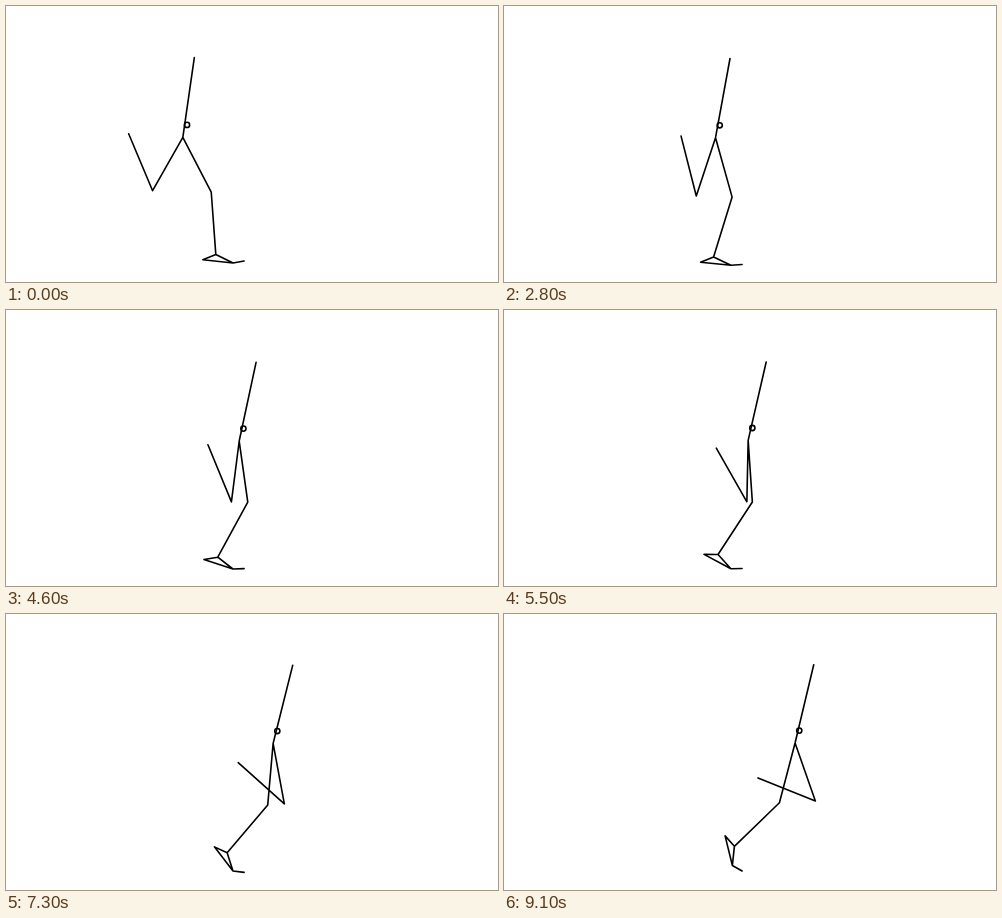
Recreate the animation shown at these times as an HTML page. Size 492 px wide and 276 px high, loop 9.2 s.

```html
<!DOCTYPE html>
<html lang="en">
<head>
<meta charset="utf-8">
<title>Walking stick figure</title>
<style>
  html, body { margin: 0; width: 100%; height: 100%; overflow: hidden; background: #fff; }
  svg { display: block; width: 492px; height: 276px; }
  path, circle { fill: none; stroke: #000; stroke-width: 1.6; stroke-linejoin: round; stroke-linecap: round; }
</style>
</head>
<body>
<svg viewBox="0 0 492 276">
  <path id="body"/>
  <circle id="mass" r="2.6"/>
</svg>
<script>
const LOOP = 9200, STEP = 100;

// A smooth curve through evenly spaced values (Lagrange), s from 0 to 1.
const curve = (...v) => s => {
  const u = s * (v.length - 1);
  return v.reduce((sum, y, i) =>
    sum + v.reduce((p, _, j) => j === i ? p : p * (u - j) / (i - j), y), 0);
};

// Joint angles in degrees from straight down, positive towards the right.
const angle = {
  toe:        curve(100.3, 94.2, 92.1, 85.8, 60.2),
  foot:       curve(64, 66.2, 52.5, 24.5, -6),
  shank:      curve(4.2, -13.4, -28.3, -38.7, -45.9),
  thigh:      curve(27.4, 17.75, 8.2, -2.55, -14.7),
  swingThigh: curve(-29.5, -21, -7.6, 7.6, 19.3),
  // These two point up, so they lean from straight up instead.
  swingShank: curve(-22.8, -13.8, -22, -43, -68.1),
  trunk:      curve(8.2, 9.9, 12.05, 13.9, 13.4)
};
const size = { toe: 11.2, foot: 19.2, heel: 14, shank: 62.7, thigh: 61.7,
               swingThigh: 61.4, swingShank: 61.8, trunk: 80.5 };
const HEEL_ANGLE = -132.4;
const toeX = 238.1, toeY = curve(255, 258.4, 258.6, 258.5, 257);

function move([x, y], length, degrees) {
  const a = degrees * Math.PI / 180;
  return [x + length * Math.sin(a), y + length * Math.cos(a)];
}

// The planted toe carries the leg, the hip carries the rest.
function pose(s) {
  const down = (from, part) => move(from, size[part], angle[part](s));
  const back = (from, part) => move(from, -size[part], angle[part](s));
  const up = (from, part) => move(from, size[part], 180 - angle[part](s));

  const toe = [toeX, toeY(s)];
  const ball = back(toe, "toe");
  const ankle = back(ball, "foot");
  const heel = move(ankle, size.heel, angle.foot(s) + HEEL_ANGLE);
  const knee = back(ankle, "shank");
  const hip = back(knee, "thigh");
  const top = up(hip, "trunk");
  const swingKnee = down(hip, "swingThigh");
  const swingAnkle = up(swingKnee, "swingShank");
  return {
    limbs: [
      [top, hip, knee, ankle, heel, ball, ankle],
      [ball, toe],
      [hip, swingKnee, swingAnkle]
    ],
    mass: [hip[0] + 4.2, hip[1] - 12.4]
  };
}

const body = document.getElementById("body");
const mass = document.getElementById("mass");
const start = performance.now();

function tick() {
  const t = (performance.now() - start) % LOOP;
  const { limbs, mass: [x, y] } = pose(Math.floor(t / STEP) * STEP / (LOOP - STEP));
  body.setAttribute("d", limbs.map(l => "M" + l.join("L")).join(""));
  mass.setAttribute("cx", x);
  mass.setAttribute("cy", y);
  requestAnimationFrame(tick);
}
tick();
</script>
</body>
</html>
```
